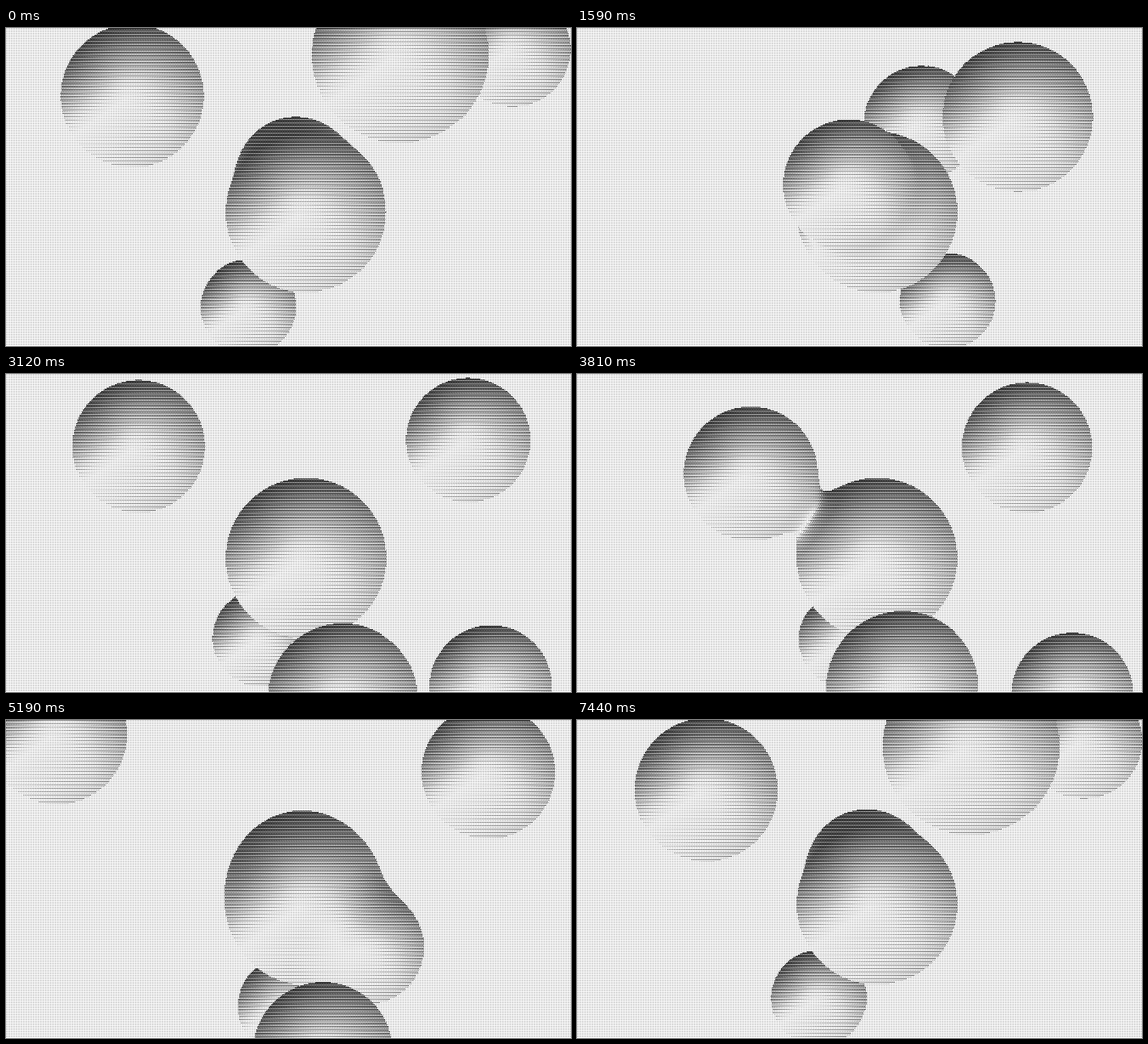
Animation, 998 px wide and 561 px high, one loop 7470 ms. Source, as an HTML page with a canvas:

```html
<!DOCTYPE html>
<html lang="en">
<head>
<meta charset="utf-8">
<title>Halftone metaballs</title>
<style>
html, body { margin: 0; width: 100%; height: 100%; overflow: hidden; background: #fff; }
canvas { display: block; width: 998px; height: 561px; }
</style>
</head>
<body>
<canvas id="stage" width="998" height="561"></canvas>
<script>
const W = 998, H = 561, LOOP = 7470, STEP = 30;
const GRID = 2, COLS = Math.ceil(W / GRID), ROWS = Math.ceil(H / GRID);
const BLEND = 50, EMPTY = 2, CAMERA = 3000;
const RAD = Math.PI / 180;

const ctx = document.getElementById('stage').getContext('2d');
const image = ctx.createImageData(W, H);
const pixels = new Uint32Array(image.data.buffer);
const light = new Float32Array(COLS * ROWS);

// Every ball drifts through its own stops at these times and swings in depth once a loop.
const TIMES = [0, 1590, 2460, 3810, 5190, 6270];
const CENTER = [530, 325];
const core = { size: 141, depth: 0, swing: 0, phase: 0, stops: TIMES.map(() => CENTER) };
const upperLeft = {
  size: 117, depth: 125, swing: 125, phase: 40,
  stops: [[223, 120], [-140, -120], [98, 37], [307, 176], [90, 25], [346, 185]]
};
const upperRight = {
  size: 121, depth: 130, swing: 540, phase: 0,
  stops: [[696, 47], [779, 157], [552, 284], CENTER, [522, 282], [740, 150]]
};
const farRight = {
  size: 107, depth: 30, swing: 260, phase: 130,
  stops: [[895, 37], [608, 167], [813, 108], [795, 130], [852, 92], [712, 127]]
};
const behind = {
  size: 93, depth: -320, swing: 0, phase: 0,
  stops: [[428, 493], [655, 482], [455, 470], [476, 470], [494, 505], CENTER]
};
const lowerRight = {
  size: 98, depth: 20, swing: 260, phase: -165,
  stops: [CENTER, CENTER, [772, 492], [875, 564], [639, 401], [725, 478]]
};
const front = {
  size: 109, depth: 230, swing: 330, phase: 180,
  stops: [[512, 263], [480, 277], [595, 553], [575, 553], [560, 586], [486, 355]]
};
const balls = [core, upperLeft, upperRight, farRight, behind, lowerRight, front];

function stopAt(ball, i) {
  const turn = Math.floor(i / TIMES.length), k = i - turn * TIMES.length;
  return { time: TIMES[k] + turn * LOOP, at: ball.stops[k] };
}

function poseAt(ball, time) {
  let i = TIMES.length - 1;
  while (TIMES[i] > time) i--;
  const [before, from, to, after] = [-1, 0, 1, 2].map(k => stopAt(ball, i + k));
  const span = to.time - from.time, u = (time - from.time) / span;
  const slope = (a, b, c) => (b.at[c] - a.at[c]) / (b.time - a.time) * span;
  const [x, y] = [0, 1].map(c => {
    const p = from.at[c], q = to.at[c];
    const m = slope(before, to, c), n = slope(from, after, c);
    return p + u * (m + u * (3 * (q - p) - 2 * m - n + u * (2 * (p - q) + m + n)));
  });
  const z = ball.depth + ball.swing * Math.cos(time / LOOP * 2 * Math.PI + ball.phase * RAD);
  return { x, y, z, r: ball.size * CAMERA / (CAMERA - z) };
}

// A bright streak runs to the lower left; tone falls with distance, faster above it.
function shade(nx, ny) {
  const u = nx + 0.1, v = ny - 0.05;
  const along = 0.57 * v - 0.82 * u, across = -0.57 * u - 0.82 * v;
  const dist = along > 0 ? Math.abs(across) : Math.hypot(u, v);
  return 1.04 - 0.56 * dist - 0.3 * across;
}

// Follows one ray into the smooth union of the nearby balls.
function trace(x, y, near) {
  let z = Math.max(...near.map(b => b.z + b.r + 14));
  const floor = Math.min(...near.map(b => b.z - b.r));
  for (let step = 0; step < 70 && z > floor; step++) {
    let dist = 0, gx = 0, gy = 0, gz = 0;
    near.forEach((b, i) => {
      const dx = x - b.x, dy = y - b.y, dz = z - b.z;
      const len = Math.sqrt(dx * dx + dy * dy + dz * dz) || 1, d = len - b.r;
      const mix = i ? Math.min(1, Math.max(0, 0.5 + 0.5 * (dist - d) / BLEND)) : 1;
      dist += (d - dist) * mix - BLEND * mix * (1 - mix);
      gx += (dx / len - gx) * mix;
      gy += (dy / len - gy) * mix;
      gz += (dz / len - gz) * mix;
    });
    if (dist < 0.8) {
      const len = Math.hypot(gx, gy, gz) || 1;
      return shade(gx / len, gy / len);
    }
    z -= dist;
  }
  return EMPTY;
}

function sample(x, y, poses) {
  const near = [];
  let edge = Infinity;
  for (const b of poses) {
    const dx = x - b.x, dy = y - b.y, d = Math.sqrt(dx * dx + dy * dy) - b.r;
    if (d < BLEND) near.push(b);
    edge = Math.min(edge, d);
  }
  if (edge > 16) return EMPTY;
  if (near.length > 1) return trace(x, y, near);
  if (edge > 0) return EMPTY;
  const [b] = near;
  return shade((x - b.x) / b.r, (y - b.y) / b.r);
}

// Each 3 by 3 cell fills from a dot to a line, then row by row; every other cell row leads.
function threshold(x, y) {
  const odd = Math.floor(y / 3) % 2, row = y % 3;
  const order = row * 3 + (x + (row ? odd : 0)) % 3;
  return order ? 1 - order / 9 + (odd ? -0.08 : 0.08) : 3;
}
const screen = Array.from({ length: 18 }, (_, i) => threshold(i % 3, Math.floor(i / 3)));

function draw(time) {
  const poses = balls.map(ball => poseAt(ball, time));
  for (let row = 0, i = 0; row < ROWS; row++) {
    for (let col = 0; col < COLS; col++, i++) {
      light[i] = sample(col * GRID + 1, row * GRID + 1, poses);
    }
  }
  for (let y = 0, i = 0; y < H; y++) {
    const line = (y >> 1) * COLS, cell = y % 6 * 3;
    for (let x = 0; x < W; x++, i++) {
      const tone = (light[line + (x >> 1)] - screen[cell + x % 3]) * 7 + 0.5;
      const v = 45 + 210 * Math.min(1, Math.max(0, tone)) | 0;
      pixels[i] = 0xff000000 | v << 16 | v << 8 | v;
    }
  }
  ctx.putImageData(image, 0, 0);
}

const start = performance.now();
let shown = -1;
function tick() {
  const elapsed = (performance.now() - start) % LOOP;
  const time = Math.floor(elapsed / STEP) * STEP;
  if (time !== shown) draw(shown = time);
  requestAnimationFrame(tick);
}
tick();
</script>
</body>
</html>
```
